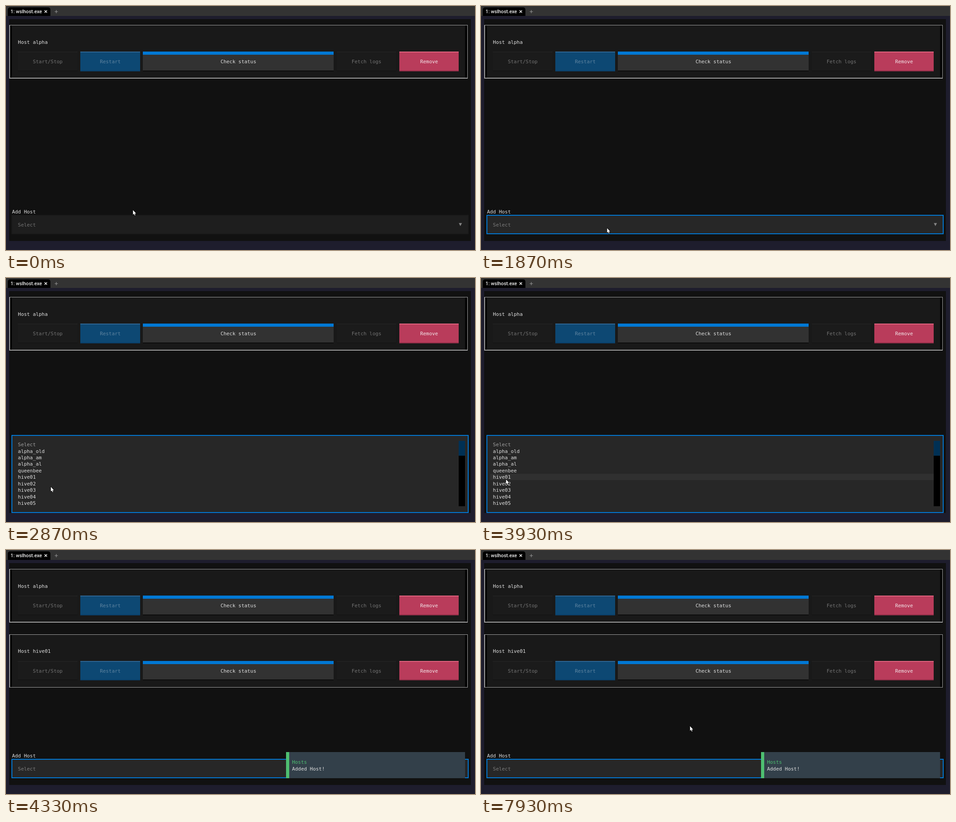
Animation of 1035 by 541 pixels, one loop 8 s. Source, as an HTML page with a canvas:

```html
<!DOCTYPE html>
<html lang="en">
<head>
<meta charset="utf-8">
<title>Host manager</title>
<style>
  html, body { margin: 0; width: 100%; height: 100%; overflow: hidden; background: #1e1d2d; }
  canvas { display: block; width: 1035px; height: 541px; }
</style>
</head>
<body>
<canvas id="stage" width="1035" height="541"></canvas>
<script>
const ctx = document.getElementById('stage').getContext('2d');
const LOOP = 8000, STEP = 200 / 3;
const MONO = '10.92px "DejaVu Sans Mono", "Noto Sans Mono", monospace';
const BLUE = '#0178d4', TEXT = '#e0e0e0', DIM = '#737373';
const OPTIONS = ['alpha_old', 'alpha_am', 'alpha_al', 'queenbee',
  'hive01', 'hive02', 'hive03', 'hive04', 'hive05'];

// Steps of the session, at 15 per second
const FOCUS = 28, OPEN = 29, HOVER = 59, ADDED = 60, GONE = 65, BACK = 116;

// Terminal grid
const col = c => 6.6 + c * 6.575;
const row = r => 28.9 + r * 14.46;

function box(x0, y0, x1, y1, color) {
  const x = Math.round(x0), y = Math.round(y0);
  ctx.fillStyle = color;
  ctx.fillRect(x, y, Math.round(x1) - x, Math.round(y1) - y);
}

function frame(x0, y0, x1, y1, line, fill) {
  box(x0, y0, x1, y1, line);
  box(x0 + 2, y0 + 2, x1 - 2, y1 - 2, fill);
}

function print(str, c, r, color = TEXT) {
  ctx.font = MONO;
  ctx.fillStyle = color;
  ctx.fillText(str, col(c), Math.round(row(r) + 11.6));
}

function shape(points, fill, stroke) {
  ctx.beginPath();
  for (const [x, y] of points) ctx.lineTo(x, y);
  ctx.closePath();
  if (stroke) {
    ctx.strokeStyle = stroke;
    ctx.lineWidth = 1.6;
    ctx.lineJoin = 'round';
    ctx.stroke();
  }
  ctx.fillStyle = fill;
  ctx.fill();
}

function button(label, c0, c1, r, look) {
  const x0 = col(c0), x1 = col(c1), y0 = row(r), y1 = row(r + 3);
  box(x0, y0, x1, y1, look.bg);
  box(x0, y0, x1, y0 + (look.band || 2), look.top);
  box(x0, y1 - 2, x1, y1, look.bottom);
  print(label, (c0 + c1 - label.length) / 2, r + 1, look.text);
}

const OFF = { bg: '#1b1b1b', top: '#212121', bottom: '#151515', text: DIM };
const PRIMARY = { bg: '#0d4873', top: '#2e6592', bottom: '#0a3f68', text: '#5f84a0' };
const STATUS = { bg: '#323232', top: BLUE, bottom: '#0d0d0d', text: TEXT, band: 7 };
const DANGER = { bg: '#b93c5b', top: '#e0637f', bottom: '#8f2d47', text: '#f3e6ea' };

function host(name, r) {
  const y0 = row(r) - 1, y1 = row(r + 8) + 1.6;
  box(7, y0, 1019, y1, '#a0a0a0');
  box(9, y0 + 1, 1018, y1 - 1.6, '#040404');
  box(13, y0 + 1, 1012.5, y1 - 1.6, '#191919');
  print('Host ' + name, 3, r + 2);
  button('Start/Stop', 3, 23, r + 4, OFF);
  button('Restart', 24, 44, r + 4, PRIMARY);
  button('Check status', 45, 109, r + 4, STATUS);
  button('Fetch logs', 110, 130, r + 4, OFF);
  button('Remove', 131, 151, r + 4, DANGER);
}

function tabBar() {
  box(0, 0, 1035, 22, '#333333');
  ctx.fillStyle = '#000';
  ctx.beginPath();
  ctx.roundRect(4, 3, 94, 19, [5, 5, 0, 0]);
  ctx.fill();
  ctx.font = '500 10.8px Roboto, Inter, sans-serif';
  ctx.fillStyle = '#f0f0f0';
  ctx.fillText('1: wslhost.exe', 10, 16);
  ctx.lineWidth = 1.5;
  ctx.strokeStyle = '#f0f0f0';
  ctx.beginPath();
  ctx.moveTo(85, 9.5); ctx.lineTo(90.5, 15);
  ctx.moveTo(90.5, 9.5); ctx.lineTo(85, 15);
  ctx.stroke();
  ctx.lineWidth = 1.2;
  ctx.strokeStyle = '#929292';
  ctx.beginPath();
  ctx.moveTo(107.5, 12.5); ctx.lineTo(114.5, 12.5);
  ctx.moveTo(111, 9); ctx.lineTo(111, 16);
  ctx.stroke();
}

function closedSelect(focused) {
  print('Add Host', 1, 29);
  frame(12, 463, 1021, 506, focused ? BLUE : '#1a1a1a', focused ? '#272727' : '#1e1e1e');
  print('Select', 3, 31, focused ? '#7c7c7c' : DIM);
  shape([[999.3, 481.3], [1006.2, 481.3], [1002.75, 488]], '#858585');
}

function openSelect(hover) {
  frame(12, 347.5, 1021, 521, BLUE, '#272727');
  if (hover) box(col(2), row(28), col(151), row(29), '#303030');
  print('Select', 3, 23, '#a0a0a0');
  OPTIONS.forEach((name, i) => print(name, 3, 24 + i));
  box(col(151), row(23), col(153), row(33), '#000');
  box(col(151), row(23), col(153), 394, '#003054');
}

function toast() {
  box(col(93), row(29), col(153), row(33), '#33404a');
  box(col(93), row(29), col(94), row(33), '#4ebf71');
  print('Hosts', 95, 30, '#4ebf71');
  print('Added Host!', 95, 31);
}

const smooth = p => p * p * (3 - 2 * p);
const slowing = p => 1 - (1 - p) ** 2;
const gaining = p => p * p;

// Pointer moves: step before, last step, easing, quadratic curve points
const MOVES = [
  [9, 16, smooth, [280, 452], [274, 470], [278, 492]],
  [33, 46, smooth, [278, 492], [170, 478], [72, 457]],
  [46, 53, slowing, [72, 457], [46, 438], [55, 446]],
  [59, 65, gaining, [55, 446], [80, 490], [150, 546]],
  [116, 119, slowing, [427, 515], [444, 450], [461, 390]]
];

function pointer(k) {
  if (k >= GONE && k < BACK) return;
  const [from, to, ease, a, b, c] = MOVES.filter(m => k >= m[0]).pop() || MOVES[0];
  const p = ease(Math.max(0, Math.min(1, (k - from) / (to - from)))), q = 1 - p;
  const [x, y] = a.map((v, i) => q * q * v + 2 * q * p * b[i] + p * p * c[i]);
  ctx.save();
  ctx.translate(x, y);
  shape([[0.3, 0.5], [0.3, 10.8], [2.5, 8.7], [4.1, 12.5], [5.6, 11.8], [4, 8.2], [7.2, 8.2]],
    '#fff', '#000');
  ctx.restore();
}

// Steps fall on multiples of 10 ms
function stepAt(t) {
  const k = Math.round(t / STEP);
  return t < Math.round(k * STEP / 10) * 10 ? k - 1 : k;
}

function draw(now) {
  const k = stepAt(now % LOOP);
  const added = k >= ADDED;
  box(0, 0, 1035, 541, '#1e1d2d');
  tabBar();
  box(col(0), row(0), col(155), row(34), '#111111');
  host('alpha', 1);
  if (added) host('hive01', 11);
  if (k >= OPEN && !added) openSelect(k >= HOVER);
  else closedSelect(k >= FOCUS);
  if (added) toast();
  pointer(k);
}

let start;
function tick(now) {
  start ??= now;
  draw(Math.max(0, now - start));
  requestAnimationFrame(tick);
}
draw(0);
requestAnimationFrame(tick);
</script>
</body>
</html>
```
